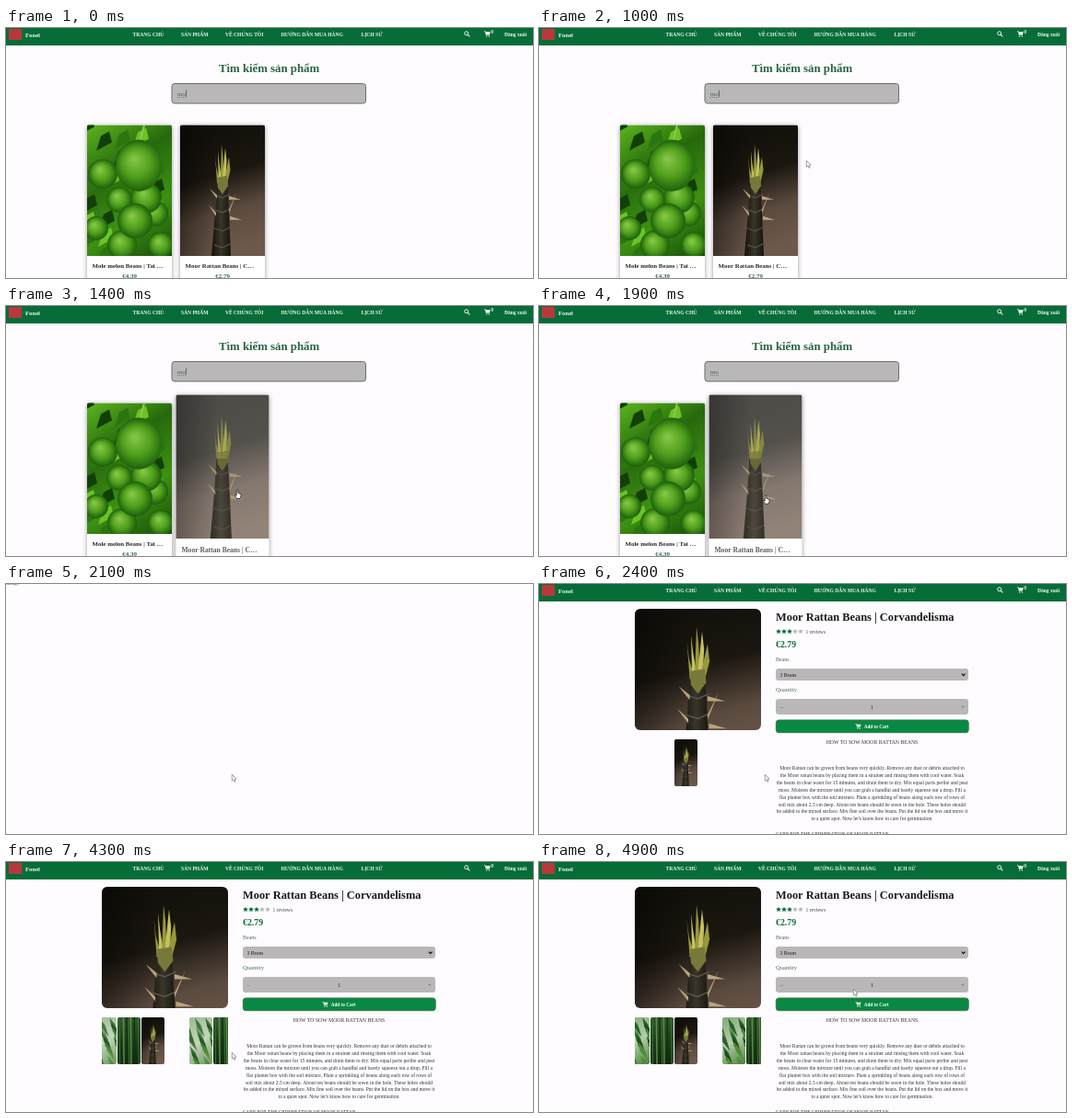
Animation, 572 px wide and 272 px high, one loop 5 s. Source, as an HTML page with a canvas:

```html
<!DOCTYPE html>
<html lang="vi">
<head>
<meta charset="utf-8">
<style>
html, body { margin: 0; width: 100%; height: 100%; overflow: hidden; background: #fefcff; }
canvas { display: block; }
</style>
</head>
<body>
<canvas id="stage" width="572" height="272"></canvas>
<script>
const LOOP = 5000, STEP = 100;
const HOVER = 1100, BLANK = 2000, PRODUCT = 2200;
const GREEN = '#066d39', PAGE = '#fefcff', GREY = '#b9b7b8', INK = '#333', NAV = '#eef5f0';
const ctx = document.getElementById('stage').getContext('2d');

const clamp = v => Math.max(0, Math.min(1, v));
const lerp = (a, b, p) => a + (b - a) * p;
const easeOut = p => 1 - (1 - p) ** 2;

function text(str, x, y, size, color = INK, weight = 'bold', align = 'left') {
  ctx.font = `${weight} ${size}px "Liberation Serif", serif`;
  ctx.textAlign = align;
  ctx.fillStyle = color;
  ctx.fillText(str, x, y);
}

function box(x, y, w, h, r, fill, stroke) {
  ctx.beginPath();
  ctx.roundRect(x, y, w, h, r);
  ctx.fillStyle = fill;
  ctx.fill();
  if (stroke) { ctx.strokeStyle = stroke; ctx.lineWidth = 1; ctx.stroke(); }
}

function poly(points, fill, stroke, width = 0.8) {
  ctx.beginPath();
  for (let i = 0; i < points.length; i += 2) ctx.lineTo(points[i], points[i + 1]);
  ctx.closePath();
  ctx.fillStyle = fill;
  ctx.fill();
  if (stroke) { ctx.strokeStyle = stroke; ctx.lineWidth = width; ctx.stroke(); }
}

function line(points, color, width) {
  ctx.beginPath();
  for (let i = 0; i < points.length; i += 2) ctx.lineTo(points[i], points[i + 1]);
  ctx.strokeStyle = color;
  ctx.lineWidth = width;
  ctx.stroke();
}

function disc(x, y, rx, fill, ry = rx) {
  ctx.beginPath();
  ctx.ellipse(x, y, rx, ry, 0, 0, 7);
  ctx.fillStyle = fill;
  ctx.fill();
}

// Clips to a frame, then paints a 92 x 142 picture scaled into the given area.
function picture(paint, frame, radius, [x, y, w, h] = frame) {
  ctx.save();
  ctx.beginPath();
  ctx.roundRect(...frame, radius);
  ctx.clip();
  ctx.translate(x, y);
  ctx.scale(w / 92, h / 142);
  paint();
  ctx.restore();
}

function wash(x0, y0, x1, y1, ...colors) {
  const g = ctx.createLinearGradient(x0, y0, x1, y1);
  colors.forEach((c, i) => g.addColorStop(i / (colors.length - 1), c));
  return g;
}

function backdrop(...args) {
  ctx.fillStyle = wash(...args);
  ctx.fillRect(0, 0, 92, 142);
}

function shoot() {
  backdrop(30, 15, 66, 133, '#13110b', '#1b1710', '#5b4b3f', '#6d594b');
  backdrop(0, 0, 42, 0, '#0006', '#0000');
  poly([40, 62, 51, 62, 53, 95, 55, 142, 34, 142, 38, 95], wash(34, 0, 55, 0, '#13110b', '#39352a', '#15130d'));
  for (const y of [76, 92, 112, 130]) line([37, y, 46, y + 3, 54, y - 1], '#5d594a', 1);
  [[38, 33], [41, 28], [45, 21], [49, 25], [53, 35]].forEach(([x, y], i) =>
    poly([x, y, x + 1.5, y + 14, 44 + i * 1.8, 63, 40 + i * 1.8, 63], i % 2 ? '#c3c061' : '#96983b'));
  poly([40, 57, 51, 55, 52, 66, 46, 75, 41, 68], '#77793a');
  for (const [x0, y0, x1, y1] of [[40, 76, 32, 69], [39, 95, 31, 87], [53, 77, 66, 81], [53, 92, 61, 74], [54, 99, 67, 103]])
    poly([x0, y0, x1, y1, x0, y0 + 4], '#baa47c');
}

function fruit() {
  backdrop(0, 0, 92, 142, '#5db51d', '#26690d', '#3d9012', '#174d09');
  for (let i = 0; i < 22; i++) {
    const x = (i * 37) % 92, y = (i * 53) % 142;
    poly([x - 9, y + 11, x - 4, y - 5, x + 5, y - 10, x + 8, y + 2], ['#123f08', '#6cc324', '#2b760f'][i % 3]);
  }
  line([62, 0, 57, 20], '#8cc852', 2);
  for (const [x, y, rx, ry = rx] of [[17, 53, 16], [10, 112, 13], [35, 81, 14], [74, 96, 14], [64, 79, 17],
    [80, 130, 14], [38, 130, 16], [52, 104, 19], [56, 44, 25, 28]]) {
    const g = ctx.createRadialGradient(x - rx * .2, y - rx * .3, 1, x, y, ry);
    g.addColorStop(0, '#86c645');
    g.addColorStop(.55, '#4f9f1d');
    g.addColorStop(1, '#1d5f0b');
    disc(x, y, rx, g, ry);
  }
}

function grove() {
  backdrop(0, 0, 0, 142, '#315a2e', '#1d4119', '#10260f');
  for (let i = 0; i < 11; i++) {
    const x = i * 9 + 3 * Math.sin(i * 5);
    line([x, 0, x + 2, 142], ['#5f8d4a', '#122d10', '#35652c'][i % 3], 4);
  }
}

function leaves() {
  backdrop(0, 0, 92, 142, '#7fa871', '#b4ccab', '#447a30');
  for (let i = 0; i < 20; i++) {
    const x = (i * 41) % 100 - 10, y = (i * 29) % 130;
    poly([x, y, x + 17, y + 20, x + 30, y + 58, x + 6, y + 28], ['#29602a', '#4d8d39', '#1b481b'][i % 3]);
  }
}

function cart(x, y, s) {
  ctx.save();
  ctx.translate(x, y);
  ctx.scale(s, s);
  line([0, .5, 1.3, .5, 2.4, 4.8, 6.3, 4.8], '#fff', .8);
  poly([1.6, 1, 7, 1, 6.2, 3.9, 2.3, 3.9], '#fff');
  disc(2.8, 6.2, .7, '#fff');
  disc(5.7, 6.2, .7, '#fff');
  ctx.restore();
}

function star(x, y, fill) {
  const points = [];
  for (let i = 0; i < 10; i++) {
    const r = i % 2 ? 1.4 : 3, a = i * Math.PI / 5;
    points.push(x + r * Math.sin(a), y - r * Math.cos(a));
  }
  poly(points, fill);
}

function header(badge) {
  ctx.fillStyle = GREEN;
  ctx.fillRect(0, 0, 572, 19);
  ctx.fillStyle = '#b8383c';
  ctx.fillRect(3, 1, 14, 12);
  text('Fonel', 21, 9.5, 6.7, NAV);
  [['TRANG CHỦ', 137.5], ['SẢN PHẨM', 190], ['VỀ CHÚNG TÔI', 238], ['HƯỚNG DẪN MUA HÀNG', 298.5], ['LỊCH SỬ', 385.5]]
    .forEach(([label, x]) => text(label, x, 9, 5.55, NAV));
  ctx.beginPath();
  ctx.arc(499.7, 5.8, 2, 0, 7);
  ctx.strokeStyle = NAV;
  ctx.lineWidth = 1;
  ctx.stroke();
  line([501.2, 7.3, 503.3, 9.4], NAV, 1.2);
  cart(519, 3.2, 0.95);
  if (badge) text('0', 526.3, 5.8, 5.5, NAV);
  text('Đăng xuất', 541, 9, 5.5, NAV);
}

function card(x, paint, name, price, hover = 0) {
  const cx = x + 46, cy = 196, scale = 1 + 0.1 * hover;
  ctx.save();
  ctx.translate(cx, cy);
  ctx.scale(scale, scale);
  ctx.translate(-cx, -cy);
  ctx.shadowColor = '#0006';
  ctx.shadowBlur = 5;
  ctx.shadowOffsetY = 1;
  box(x, 105.5, 92, 180, 2, '#fff');
  ctx.shadowColor = 'transparent';
  ctx.globalAlpha = 1 - 0.25 * hover;
  picture(paint, [x, 105.5, 92, 142.5], [2, 2, 0, 0]);
  text(name, x + 5.5, 261, 6.9, '#2a2a2a');
  text(price, cx, 272, 7, '#3a6a4d', 'bold', 'center');
  ctx.restore();
}

function searchPage(t) {
  header(true);
  text('Tìm kiếm sản phẩm', 285.5, 48, 12.8, '#2a6540', 'bold', 'center');
  box(180, 60.5, 210.5, 21.5, 3, GREY, '#6b6e6c');
  text('mo', 185.7, 74, 7, '#3d6a4c', 'normal');
  ctx.setLineDash([1, 1]);
  line([186, 75.5, 195, 75.5], '#5b7562', .8);
  ctx.setLineDash([]);
  if (Math.floor(t / 500) % 2 === 0) line([195.5, 67.5, 195.5, 75], '#444', .7);
  card(88, fruit, 'Mole melon Beans | Tai …', '€4.39');
  card(189, shoot, 'Moor Rattan Beans | C…', '€2.79', easeOut(clamp((t - HOVER) / 300)));
}

const GUIDE = [
  'Moor Rattan can be grown from beans very quickly. Remove any dust or debris attached to',
  'the Moor rattan beans by placing them in a strainer and rinsing them with cool water. Soak',
  'the beans in clear water for 15 minutes, and drain them to dry. Mix equal parts perlite and peat',
  'moss. Moisten the mixture until you can grab a handful and barely squeeze out a drop. Fill a',
  'flat planter box with the soil mixture. Plant a sprinkling of beans along each row of rows of',
  'soil mix about 2.5 cm deep. About ten beans should be sown in the hole. These holes should',
  'be added to the mixed surface. Mix fine soil over the beans. Put the lid on the box and move it',
  'to a quiet spot. Now let\'s know how to care for germination.'
];

function thumbs(t) {
  const fadeFrom = start => clamp((t - start + STEP) / 500);
  const thumb = (paint, x, alpha) => {
    ctx.globalAlpha = alpha;
    picture(paint, [x, 169, 25, 51], 2, [x - 4, 169, 33, 51]);
  };
  ctx.save();
  ctx.beginPath();
  ctx.rect(104, 168, 137, 53);
  ctx.clip();
  for (const x of [95, 199]) {
    thumb(leaves, x, fadeFrom(4000));
    thumb(grove, x + 26, fadeFrom(3000));
  }
  thumb(shoot, 147, 1);
  ctx.restore();
}

function productPage(t) {
  header(t >= 2300);
  picture(shoot, [104, 27, 137, 132], 6, [104, 18, 137, 192]);
  thumbs(t);
  text('Moor Rattan Beans | Corvandelisma', 257, 40, 12.4, '#1a1a1a');
  for (let i = 0; i < 5; i++) star(260 + i * 6, 51.7, i < 3 ? '#0b6b39' : '#b5bab6');
  text('1 reviews', 289.5, 54, 5.6, '#444', 'normal');
  text('€2.79', 257, 69, 9.8, '#14703c');
  text('Beans', 257, 84, 6, '#50695a', 'normal');
  box(257, 92, 209, 13, 3, GREY);
  text('3 Beans', 261.5, 100.7, 5.6, '#222', 'normal');
  line([458.8, 97.6, 460.7, 99.6, 462.6, 97.6], '#111', 1.2);
  text('Quantity', 257, 117, 6.6, '#50695a', 'normal');
  box(257, 125, 209, 17, 3, GREY);
  text('−', 263.5, 135.5, 6, '#444', 'normal', 'center');
  text('1', 361.5, 135.5, 6, '#222', 'normal', 'center');
  text('+', 460, 135.5, 6, '#444', 'normal', 'center');
  box(257.3, 148, 208.9, 13.7, 3, '#078844', '#3c7a3c');
  cart(343.5, 152, 0.85);
  text('Add to Cart', 352.7, 157, 5.2, '#fff');
  text('HOW TO SOW MOOR RATTAN BEANS', 361.5, 174, 5.75, INK, 'normal', 'center');
  GUIDE.forEach((s, i) => text(s, 361.5, 202 + i * 7.9, 5.5, INK, 'normal', 'center'));
  text('CARE FOR THE GERMINATION OF MOOR RATTAN', 257, 273.7, 5.3, INK, 'normal');
}

// Pointer path: time, x, y
const PATH = [[500, 353, 226], [1000, 290, 144], [1400, 251, 200], [BLANK, 245, 207],
  [4300, 245, 207], [4500, 279, 183], [4900, 341, 138]];

function pointer(t) {
  if (t < PATH[0][0]) return;
  const i = Math.max(1, PATH.findIndex(k => k[0] >= t));
  const [t0, x0, y0] = PATH[i - 1], [t1, x1, y1] = PATH[i];
  const p = (t - t0) / (t1 - t0);
  ctx.save();
  ctx.translate(lerp(x0, x1, p), lerp(y0, y1, p));
  if (t >= HOVER && t < BLANK)
    poly([-.8, 0, .8, 0, .9, 3.5, 4, 4.6, 4, 7, 3, 9.5, -.6, 9.5, -2.6, 6, -2, 5.2, -.8, 6.3], '#fff', '#222');
  else
    poly([.3, .2, .3, 7.2, 1.9, 5.8, 3, 8.3, 4.1, 7.8, 3, 5.3, 5, 5.1], '#fff', '#777', .7);
  ctx.restore();
}

function draw() {
  const t = Math.floor(performance.now() % LOOP / STEP) * STEP;
  ctx.fillStyle = PAGE;
  ctx.fillRect(0, 0, 572, 272);
  if (t < BLANK) searchPage(t);
  else if (t < PRODUCT) text('Loading...', -5, 1.2, 5, '#555', 'normal');
  else productPage(t);
  pointer(t);
  requestAnimationFrame(draw);
}
draw();
</script>
</body>
</html>
```
